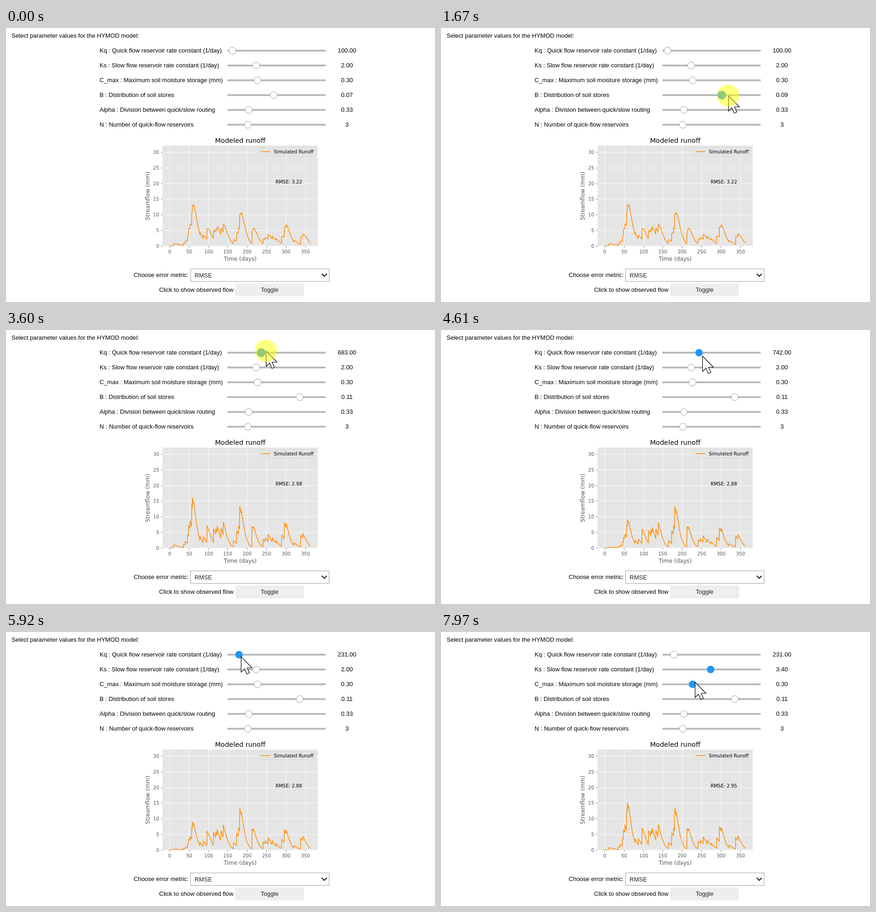
Animation, 926 px wide and 592 px high, one loop 8 s. Source, as an HTML page:

```html
<!DOCTYPE html>
<html lang="en">
<head>
<meta charset="utf-8">
<title>HYMOD parameters</title>
<style>
  html, body { margin: 0; width: 100%; height: 100%; overflow: hidden; background: #fff; }
  svg { display: block; font: 13px "Liberation Sans", Arial, sans-serif; }
  .plot { font-family: "DejaVu Sans", sans-serif; font-size: 10px; }
  .mid { text-anchor: middle; }
  .end { text-anchor: end; }
  .grey { fill: #555; }
</style>
</head>
<body>
<svg id="stage" width="926" height="592" viewBox="0 0 926 592"></svg>
<script>
const LOOP = 8000, START = 500, TICK = 68.55;
const X0 = 353.5, Y0 = 471;

const sliders = [
  { label: 'Kq : Quick flow reservoir rate constant (1/day)', x: 489, value: '100.00' },
  { label: 'Ks : Slow flow reservoir rate constant (1/day)', x: 540, value: '2.00' },
  { label: 'C_max : Maximum soil moisture storage (mm)', x: 543, value: '0.30' },
  { label: 'B : Distribution of soil stores', x: 578, value: '0.07' },
  { label: 'Alpha : Division between quick/slow routing', x: 524, value: '0.33' },
  { label: 'N : Number of quick-flow reservoirs', x: 522, value: '3' },
];
const rowY = i => 49 + 32 * i;

// The cursor rests between moves; free moves ease, drags run evenly.
const entry = { x: 850, y: 22 };
const moves = [
  { from: 0, to: 9, x: 583, y: 147 },
  { from: 11, to: 20, x: 639, y: 146, drag: true },
  { from: 31, to: 39, x: 493, y: 46 },
  { from: 42.4, to: 44.16, x: 561, y: 45, drag: true },
  { from: 58, to: 61, x: 565, y: 60 },
  { from: 63, to: 66.4, x: 559, y: 48 },
  { from: 66.4, to: 74.4, x: 504.9, y: 48, drag: true },
  { from: 76, to: 79, x: 507, y: 53 },
  { from: 83, to: 86, x: 544, y: 81 },
  { from: 86, to: 88, x: 580, y: 81, drag: true },
  { from: 89, to: 91, x: 585, y: 81, drag: true },
  { from: 103, to: 109, x: 548, y: 108 },
];

function cursorAt(tick) {
  let { x, y } = entry;
  for (const m of moves) {
    if (tick <= m.from) break;
    const u = Math.min(1, (tick - m.from) / (m.to - m.from));
    const part = m.drag ? u : u * u * (3 - 2 * u);
    x += (m.x - x) * part;
    y += (m.y - y) * part;
  }
  return { x, y };
}

const snap = (x, origin, step) => origin + Math.round((x - origin) / step) * step;
const kqText = x => Math.round(100 + (x - 489) * 9.435) + '.00';

// Each drag holds the button from press to release; the handle trails by one tick.
const drags = [
  { row: 3, press: 12, release: 23, grip: 5, place: x => snap(x, 578, 14), show: x => (0.07 + (x - 578) / 1400).toFixed(2) },
  { row: 0, press: 40, release: 49, grip: 4, place: x => x, show: kqText },
  { row: 0, press: 67, release: 77, grip: 2, place: x => x, show: kqText },
  { row: 1, press: 86, release: 92, grip: 4, place: x => snap(x, 540, 3), show: x => (2 + (x - 540) / 30).toFixed(2) },
];

// Storms: position and the rise each one adds, both in pixels
const storms = [
  [362, 6], [383, 7], [387, 7], [392, 18], [394, 23], [397, 18], [401, 48], [402.5, 24],
  [405, 8], [419, 10], [426, 14], [434, 36], [448, 30], [453, 13], [456, 14], [464, 22],
  [469, 28], [491, 13], [498, 27], [502, 18], [504.5, 50], [508, 8], [531, 44], [534, 5],
  [555, 16], [560, 8], [566, 16], [575, 10], [583, 6], [595, 24], [601, 35], [605, 10],
  [622, 6], [636, 25], [641, 10],
];
const recede = d => d < 0 ? 0 : Math.exp(-((d / 12) ** 1.7));
const bell = (x, centre, width) => Math.exp(-(((x - centre) / width) ** 2));

// Dry soil takes part of the storms at the start of the year and again in autumn.
function curve(dryness, span, slowShare) {
  const points = [];
  let mean = 0;
  for (let x = 353; x <= 657.5; x += 0.5) {
    let height = 0;
    for (const [at, rise] of storms) {
      const loss = dryness * (bell(at, 353, span) + 0.25 * bell(at, 595, 40));
      height += rise * (1 - loss) * recede(x - at);
    }
    mean += 0.1 * (height - mean);
    points.push(`${x},${(Y0 - 0.5 - height - slowShare * (mean - height)).toFixed(2)}`);
  }
  return points.join(' ');
}

const runs = [
  { from: -1, rmse: '3.22', points: curve(0, 35, 0.43) },
  { from: 27, rmse: '2.98', points: curve(0, 35, 0) },
  { from: 52, rmse: '2.88', points: curve(0.8, 60, 0) },
  { from: 80, rmse: '2.89', points: curve(0.6, 35, 0) },
  { from: 96, rmse: '2.95', points: curve(0.3, 35, 0) },
];

const text = (x, y, str, attrs = '') => `<text x="${x}" y="${y}" ${attrs}>${str}</text>`;
const rect = (x, y, w, h, attrs = '') => `<rect x="${x}" y="${y}" width="${w}" height="${h}" ${attrs}/>`;
const line = (d, color, width) => `<path d="${d}" fill="none" stroke="${color}" stroke-width="${width}"/>`;

function sliderMarkup() {
  return sliders.map((s, i) => {
    const y = rowY(i);
    return text(202, y + 4, s.label) + rect(478, y - 2, 212, 4, 'fill="#bbb"') +
      `<circle class="handle" cy="${y}"/>` + text(736, y + 4, '', 'class="mid value"');
  }).join('');
}

function plotMarkup() {
  let grid = '', ticks = '', labels = '';
  for (let i = 0; i < 8; i++) {
    const x = Math.floor(X0 + 41.8 * i) + 0.5;
    grid += `M${x} 254V471`;
    ticks += `M${x} 471v3.5`;
    labels += text(x, 487, 50 * i, 'class="mid grey"');
  }
  for (let i = 0; i < 7; i++) {
    const y = Math.floor(Y0 - 33.75 * i);
    grid += `M338 ${y + 0.5}H673`;
    ticks += `M338 ${y + 0.5}h-3.5`;
    labels += text(330.5, y + 4, 5 * i, 'class="end grey"');
  }
  return `<g class="plot">
    <clipPath id="axes">${rect(338, 254, 335, 217)}</clipPath>
    ${rect(338, 254, 335, 217, 'fill="#e5e5e5"')}
    <g clip-path="url(#axes)">${line(grid, '#fff', 0.8)}
      <polyline id="runoff" fill="none" stroke="#ff8c00" stroke-width="1.5" stroke-linejoin="round"/></g>
    ${line(ticks, '#555', 0.8)}${labels}
    ${rect(546, 258.5, 122.5, 17.5, 'rx="2" fill="#e5e5e5" fill-opacity=".8" stroke="#ccc" stroke-opacity=".5"')}
    ${line('M550 267H570.5', '#ff8c00', 1.5)}
    ${text(578, 271, 'Simulated Runoff')}
    ${text(582, 336, '', 'id="rmse"')}
    ${text(505.5, 248, 'Modeled runoff', 'class="mid" font-size="14.4"')}
    ${text(505.5, 503, 'Time (days)', 'class="mid grey" font-size="12"')}
    ${text(0, 0, 'Streamflow (mm)', 'class="mid grey" font-size="12" transform="translate(310 363) rotate(-90)"')}
  </g>`;
}

const stage = document.getElementById('stage');
stage.innerHTML = text(12, 21, 'Select parameter values for the HYMOD model:') +
  sliderMarkup() + plotMarkup() +
  text(394, 538, 'Choose error metric:', 'class="end"') +
  rect(398.5, 520.5, 299, 27, 'fill="#fff" stroke="#9e9e9e"') +
  text(407, 539, 'RMSE', 'fill="#222"') +
  line('M681.5 531l5.5 5.5l5.5 -5.5', '#111', 2) +
  text(491, 570, 'Click to show observed flow', 'class="end"') +
  rect(495, 552, 148, 28, 'fill="#eee"') +
  text(569, 570, 'Toggle', 'class="mid" fill="#222"') +
  `<g id="cursor">
    <path d="M.5 .5V33.5L8 26.5L13 38L18.5 35.5L13.5 24.5H24Z" fill="#fff" stroke="#000" stroke-width="1.2"/>
    <circle id="halo" r="24" fill="#ff0" fill-opacity=".5"/></g>`;

const find = id => document.getElementById(id);
const runoff = find('runoff'), rmse = find('rmse'), cursor = find('cursor'), halo = find('halo');
const handles = stage.querySelectorAll('.handle'), values = stage.querySelectorAll('.value');

function draw(time) {
  const tick = time < START ? -1 : Math.floor((time - START) / TICK + 0.17);
  const tip = cursorAt(tick);
  const state = sliders.map(({ x, value }) => ({ x, value }));
  let focus = -1, pressed = false;

  for (const d of drags) {
    if (tick < d.press) break;
    focus = d.row;
    pressed = tick < d.release;
    if (tick > d.press) {
      const x = d.place(cursorAt(Math.min(tick, d.release) - 1).x - d.grip);
      state[d.row] = { x, value: d.show(x) };
    }
  }

  state.forEach(({ x, value }, i) => {
    const hover = !pressed && tick >= 0 && Math.hypot(x - tip.x, rowY(i) - tip.y) < 8;
    const active = i === focus || hover;
    const handle = handles[i];
    handle.setAttribute('cx', x);
    handle.setAttribute('r', !active ? 7.5 : pressed ? 9.6 : 8);
    handle.setAttribute('fill', active ? '#2196f3' : '#fff');
    handle.setAttribute('stroke', active ? 'none' : '#9e9e9e');
    values[i].textContent = value;
  });

  const run = runs.filter(r => tick >= r.from).pop();
  runoff.setAttribute('points', run.points);
  rmse.textContent = 'RMSE: ' + run.rmse;
  cursor.setAttribute('transform', `translate(${Math.round(tip.x)} ${Math.round(tip.y)})`);
  cursor.setAttribute('visibility', tick < 0 ? 'hidden' : 'visible');
  halo.setAttribute('display', pressed ? 'inline' : 'none');
}

const begin = performance.now();
function frame() {
  draw((performance.now() - begin) % LOOP);
  requestAnimationFrame(frame);
}
frame();
</script>
</body>
</html>
```
